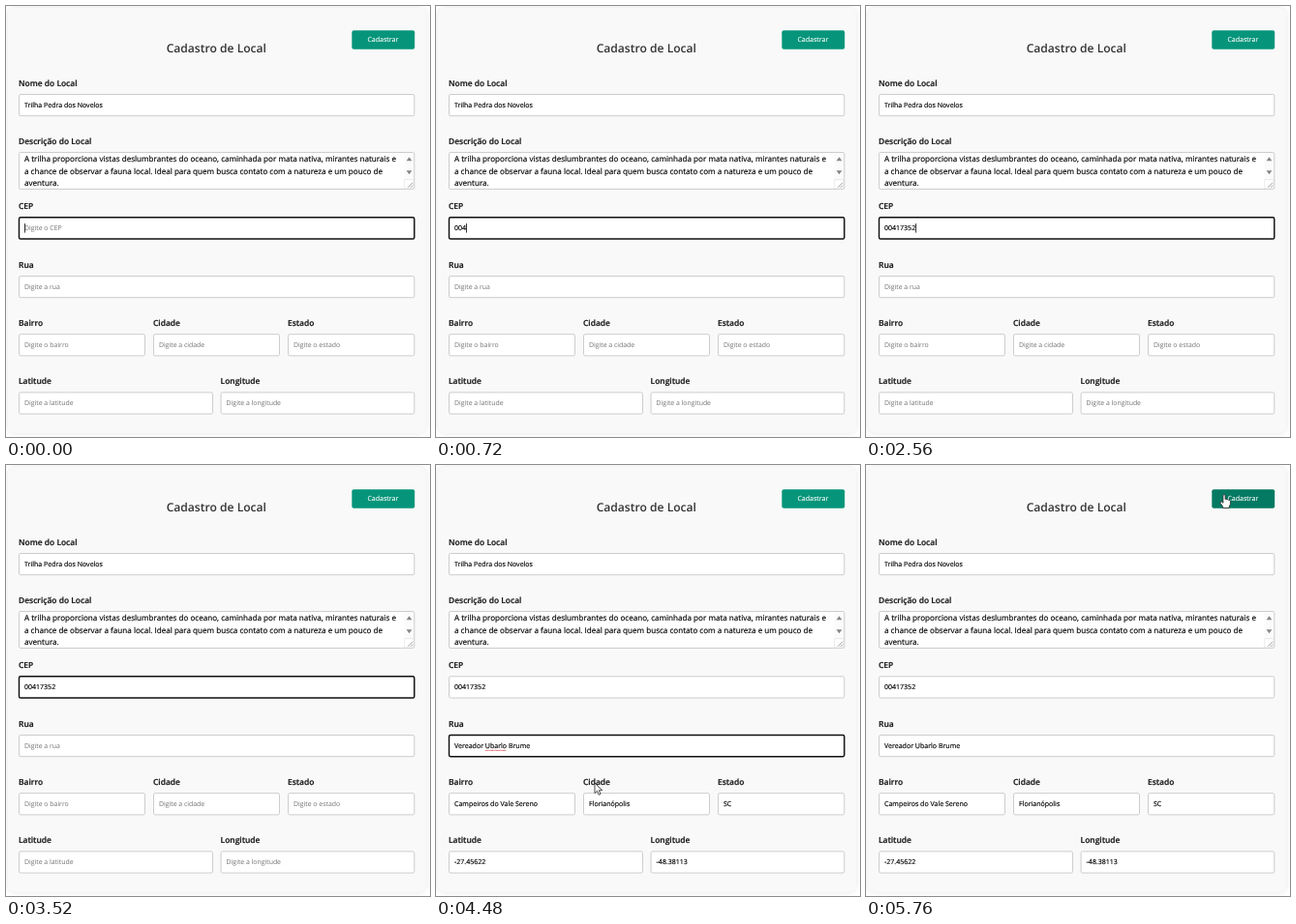
An HTML page for the animation above (5920 ms loop, 438 by 446 pixels).

```html
<!DOCTYPE html>
<html lang="pt-BR">
<head>
<meta charset="utf-8">
<title>Cadastro de Local</title>
<style>
  html, body { margin: 0; width: 100%; height: 100%; overflow: hidden; background: #fff; }
  svg { display: block; width: 100vw; height: 100vh; }
  text {
    font: 7.04px "Open Sans", "Noto Sans", sans-serif;
    fill: #000; white-space: pre; text-rendering: geometricPrecision;
  }
  .card { fill: #f9f9f9; filter: drop-shadow(0 0 3px rgba(0, 0, 0, .1)); }
  .title { font-size: 12.1px; font-weight: 600; fill: #333; text-anchor: middle; }
  .label { font-size: 8.44px; font-weight: 600; fill: #161616; stroke: #161616; stroke-width: .2; }
  .body { font-size: 8.11px; }
  .body, .value { stroke: #000; stroke-width: .16; }
  .box { fill: #fff; stroke: #c8c8c8; stroke-width: .9; }
  .box.focus { stroke: #101010; stroke-width: 1.45; }
  .empty { fill: #707070; font-size: 6.9px; }
  .button { fill: #06957a; }
  .button.hover { fill: #057a63; }
  .caption { fill: #fff; stroke: #fff; stroke-width: .12; text-anchor: middle; }
  .caret { fill: #000; }
  .wave { fill: none; stroke: #e0393e; stroke-width: .7; }
  .cursor { fill: #fff; stroke: #222; stroke-width: .8; stroke-linejoin: round; }
</style>
</head>
<body>
<svg id="stage" viewBox="0 0 438 446" preserveAspectRatio="none"></svg>
<script>
const LOOP = 5920, STEP = 80;
const stage = document.getElementById('stage');

function add(tag, attrs, text, parent = stage) {
  const el = document.createElementNS('http://www.w3.org/2000/svg', tag);
  for (const key in attrs) el.setAttribute(key, attrs[key]);
  if (text) el.textContent = text;
  parent.append(el);
  return el;
}

const show = (el, on) => el.setAttribute('visibility', on ? 'visible' : 'hidden');

// A labelled input; y is the top edge of its box.
function field(label, x, y, width, hint) {
  add('text', { class: 'label', x, y: y - 8.5 }, label);
  const box = add('rect', { x: x + .5, y: y + .5, width: width - 1, height: 22.2, rx: 1.6 });
  const text = add('text', { x: x + 6, y: y + 13.7 });
  return {
    text, x: x + 6, y,
    set(value, focused) {
      text.textContent = value || hint;
      text.setAttribute('class', value ? 'value' : 'empty');
      box.setAttribute('class', focused ? 'box focus' : 'box');
    }
  };
}

add('rect', { class: 'card', x: 2, y: 2, width: 432, height: 440, rx: 7 });
add('text', { class: 'title', x: 217.3, y: 48.1 }, 'Cadastro de Local');
const button = add('rect', { x: 357.3, y: 25.2, width: 64.9, height: 19.5, rx: 2 });
add('text', { class: 'caption', x: 389.4, y: 37 }, 'Cadastrar');

const place = field('Nome do Local', 13, 91, 409.3, '');
place.set('Trilha Pedra dos Novelos', false);

// Description area with its scroll arrows and resize grip
add('text', { class: 'label', x: 13, y: 143 }, 'Descrição do Local');
add('rect', { class: 'box', x: 13.5, y: 151.5, width: 408.3, height: 38, rx: 1.6 });
const clip = add('clipPath', { id: 'area' });
add('rect', { x: 14, y: 152, width: 398, height: 37 }, '', clip);
const area = add('g', { 'clip-path': 'url(#area)' });
[
  'A trilha proporciona vistas deslumbrantes do oceano, caminhada por mata nativa, mirantes naturais e',
  'a chance de observar a fauna local. Ideal para quem busca contato com a natureza e um pouco de',
  'aventura.'
].forEach((line, i) => add('text', { class: 'body', x: 19, y: 160.6 + i * 12.9 }, line, area));
add('rect', { x: 411.5, y: 152, width: 9.5, height: 28, fill: '#fbfbfb' });
add('path', { d: 'M413.6 160.2h5.8l-2.9-4zM413.6 170.2h5.8l-2.9 4z', fill: '#858585' });
add('rect', { x: 411.8, y: 179.8, width: 9.2, height: 9.2, fill: '#fff', stroke: '#ddd', 'stroke-width': .6 });
add('path', { d: 'M415 187.8l5-5M418 187.8l2-2', stroke: '#777', 'stroke-width': .7 });

const zip = field('CEP', 13, 218.3, 409.3, 'Digite o CEP');
const street = field('Rua', 13, 279, 409.3, 'Digite a rua');

const results = [
  [field('Bairro', 13, 339.2, 131, 'Digite o bairro'), 'Campeiros do Vale Sereno', 3680],
  [field('Cidade', 152, 339.2, 131, 'Digite a cidade'), 'Florianópolis', 3680],
  [field('Estado', 291, 339.2, 131.3, 'Digite o estado'), 'SC', 3680],
  [field('Latitude', 13, 399.4, 201, 'Digite a latitude'), '-27.45622', 3760],
  [field('Longitude', 221.6, 399.4, 200.7, 'Digite a longitude'), '-48.38113', 3760]
];

const caret = add('rect', { class: 'caret', width: .8, height: 9.5 });
const wave = add('path', { class: 'wave' });
const arrow = add('path', {
  class: 'cursor', d: 'M0 0V10.6L2.5 8.3L4.2 12.3L6 11.5L4.3 7.7H7.6Z'
});
const hand = add('path', {
  class: 'cursor',
  d: 'M-1.1 .9Q0-.9 1.1 .9V5Q2.1 4.1 3 5.3Q4 4.7 4.7 5.8Q6.4 5.4 6.4 7.2V10.2L5.2 12.3V14H-1.4V12.6L-4 8.8Q-4.3 6.9-2.6 7.5L-1.1 8.8Z'
});

const CEP = '00417352', STREET = 'Vereador Ubarlo Brume';
const FOCUS_STREET = 3600, FILL = 3680, HOVER = 5200, CLICK = 5360;
// [time, typed digits]
const typing = [[0, 0], [320, 1], [480, 2], [640, 3], [960, 4], [1360, 5], [1760, 6], [2560, 8]];
// Spans in which the caret shows
const blinks = [[0, 160], [320, 2720], [FOCUS_STREET, 4160], [4720, 5200]];
// [time, x, y]
const path = [
  [4320, 157, 335], [4480, 164, 329], [4640, 212, 262], [4800, 315, 92],
  [4880, 344, 45], [4960, 356, 27], [5040, 358.8, 21.5], [5200, 366, 28], [5360, 370, 30.5]
];

function pointerAt(t) {
  const i = path.findIndex(p => p[0] > t);
  if (i < 0) return path[path.length - 1].slice(1);
  const [t0, x0, y0] = path[i - 1], [t1, x1, y1] = path[i];
  const k = (t - t0) / (t1 - t0);
  return [x0 + (x1 - x0) * k, y0 + (y1 - y0) * k];
}

// Spelling mark under the second word of the street
function drawWave() {
  const start = street.text.getStartPositionOfChar(9).x;
  const end = street.text.getEndPositionOfChar(14).x;
  let d = '';
  for (let x = start, i = 0; x <= end; x += 1.2, i++) {
    d += (i ? 'L' : 'M') + x + ' ' + (i % 2 ? 294.8 : 296);
  }
  wave.setAttribute('d', d);
}

function render(t) {
  const digits = typing.filter(k => k[0] <= t).pop()[1];
  const onStreet = t >= FOCUS_STREET && t < CLICK;
  const filled = t >= FILL;
  zip.set(CEP.slice(0, digits), t < FOCUS_STREET);
  street.set(filled ? STREET : '', onStreet);
  for (const [item, value, time] of results) item.set(t >= time ? value : '', false);

  const active = onStreet ? street : zip;
  const hasText = onStreet ? filled : digits > 0;
  const length = hasText ? active.text.getComputedTextLength() : 0;
  caret.setAttribute('x', active.x + length + .1);
  caret.setAttribute('y', active.y + 6.8);
  show(caret, blinks.some(([from, to]) => t >= from && t < to));

  const marked = onStreet && filled;
  if (marked) drawWave();
  show(wave, marked);

  const moving = t >= path[0][0], over = t >= HOVER;
  button.setAttribute('class', over ? 'button hover' : 'button');
  show(arrow, moving && !over);
  show(hand, over);
  if (moving) {
    const at = `translate(${pointerAt(t).join(' ')})`;
    arrow.setAttribute('transform', at);
    hand.setAttribute('transform', at);
  }
}

const origin = performance.now();
let last = -1;
function tick() {
  const elapsed = Math.max(0, performance.now() - origin) % LOOP;
  const t = Math.floor(elapsed / STEP) * STEP;
  if (t !== last) render(last = t);
  requestAnimationFrame(tick);
}
tick();
</script>
</body>
</html>
```
